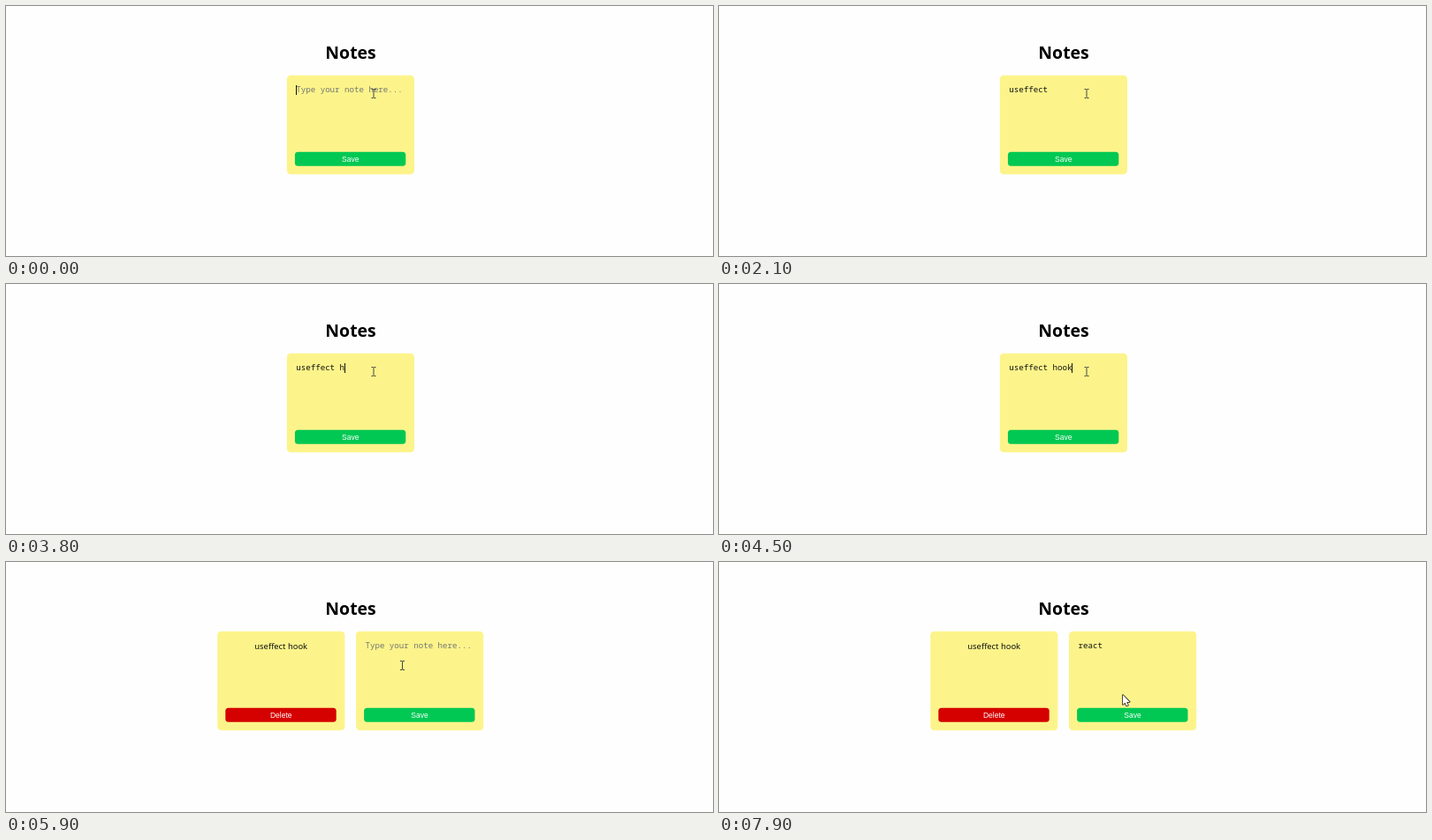
An HTML page with a canvas that plays this animation: 800 by 284 pixels, repeating every 8000 ms.

```html
<!DOCTYPE html>
<html lang="en">
<head>
<meta charset="utf-8">
<title>Notes</title>
<style>
  html, body { margin: 0; width: 100%; height: 100%; overflow: hidden; background: #fefefe; }
  canvas { display: block; }
</style>
</head>
<body>
<canvas id="stage" width="800" height="284"></canvas>
<script>
const ctx = document.getElementById('stage').getContext('2d');
const LOOP = 8000, STEP = 100, BLINK = 530, SAVED = 5400;
const SANS = '"Noto Sans", "Open Sans", sans-serif';
const MONO = '9.14px "Noto Sans Mono", "DejaVu Sans Mono", monospace';
const UI = '8.5px "Liberation Sans", Arial, sans-serif';
const CHAR = 5.5, INK = '#111';
const AREA_END = 148, BUTTON = 166;

// Notes are typed in bursts at a steady pace
const first = { focus: 0, blur: 5200, pace: 150, bursts: [
  { at: 250, text: 'useffec' }, { at: 1480, text: 't' }, { at: 3600, text: ' hook' }
] };
const second = { focus: 6000, blur: LOOP, pace: 220, bursts: [{ at: 6200, text: 'react' }] };

const rest = { x: 416, y: 99.5 };
const moves = [
  { at: 4600, span: 500, x: 416, y: 169 },
  { at: 5500, span: 300, x: 448.5, y: 117.5 },
  { at: 7500, span: 300, x: 457, y: 151 }
];

const arrowPath = new Path2D('M0 0V11L2.5 8.8 4.2 12.5 5.9 11.7 4.3 8.1 7.7 7.9Z');
const handPath = new Path2D();
handPath.roundRect(-0.8, 0.4, 1.8, 10, 0.9);
for (let i = 0; i < 3; i++) handPath.roundRect(1 + 2 * i, 5 + 0.4 * i, 1.9, 6, 0.9);
handPath.roundRect(-3.8, 8.6, 4, 3, 1.2);
handPath.roundRect(-1.2, 8, 8, 7.2, [0, 0, 3, 3]);

const ease = u => u * u * (3 - 2 * u);

function pointerAt(t) {
  let { x, y } = rest;
  for (const m of moves) {
    const e = ease(Math.min(1, Math.max(0, (t - m.at) / m.span)));
    x += (m.x - x) * e;
    y += (m.y - y) * e;
  }
  return { x, y };
}

function typedAt(note, t) {
  let text = '', last = note.focus;
  for (const b of note.bursts) {
    if (t < b.at) break;
    const n = Math.min(b.text.length, 1 + Math.floor((t - b.at) / note.pace));
    text += b.text.slice(0, n);
    last = b.at + (n - 1) * note.pace;
  }
  return { text, last };
}

function box(x, y, w, h, r, color) {
  ctx.fillStyle = color;
  ctx.beginPath();
  ctx.roundRect(x, y, w, h, r);
  ctx.fill();
}

function label(text, x, y, font, color, align = 'center') {
  ctx.font = font;
  ctx.fillStyle = color;
  ctx.textAlign = align;
  ctx.fillText(text, x, y);
}

function card(x, color, caption, hover) {
  box(x, 78.8, 144.2, 112.4, 4.5, '#fcf48a');
  ctx.globalAlpha = hover ? 0.8 : 1;
  box(x + 9.1, 165.7, 125.4, 16.1, 3.5, color);
  ctx.globalAlpha = 1;
  label(caption, x + 72, 177, UI, '#fff');
}

function editor(x, note, t, hover) {
  card(x, '#00c853', 'Save', hover);
  const { text, last } = typedAt(note, t);
  const left = x + 10.5;
  label(text || 'Type your note here...', left, 98.3, MONO, text ? INK : '#757575', 'left');
  const focused = t >= note.focus && t < note.blur;
  if (focused && Math.floor((t - last) / BLINK) % 2 === 0) {
    ctx.fillStyle = INK;
    ctx.fillRect(Math.floor(left + text.length * CHAR), 90, 1, 11);
  }
}

// Outline first, so overlapping parts merge into one shape
function cursor(path) {
  ctx.lineJoin = 'round';
  ctx.lineWidth = 1.6;
  ctx.strokeStyle = '#222';
  ctx.stroke(path);
  ctx.fillStyle = '#fff';
  ctx.fill(path);
}

function ibeam() {
  ctx.fillStyle = '#444';
  ctx.fillRect(-0.5, -5, 1, 10);
  for (const y of [-5.5, 4.5]) {
    ctx.fillRect(-2.5, y, 2, 1);
    ctx.fillRect(0.5, y, 2, 1);
  }
}

function draw(t) {
  ctx.fillStyle = '#fefefe';
  ctx.fillRect(0, 0, 800, 284);
  label('Notes', 390, 59.7, 'bold 19.4px ' + SANS, '#000');

  const p = pointerAt(t);
  const hover = p.y >= BUTTON;
  if (t < SAVED) {
    editor(317.8, first, t, hover);
  } else {
    card(239.2, '#d50000', 'Delete', false);
    label(typedAt(first, t).text, 311.2, 99, '9.4px ' + SANS, INK);
    editor(396, second, t, hover);
  }

  ctx.save();
  ctx.translate(p.x, p.y);
  if (hover) cursor(handPath);
  else if (p.y > AREA_END) cursor(arrowPath);
  else ibeam();
  ctx.restore();
}

const start = performance.now();
function tick() {
  const t = (performance.now() - start) % LOOP;
  draw(Math.floor(t / STEP) * STEP);
  requestAnimationFrame(tick);
}
tick();
</script>
</body>
</html>
```
